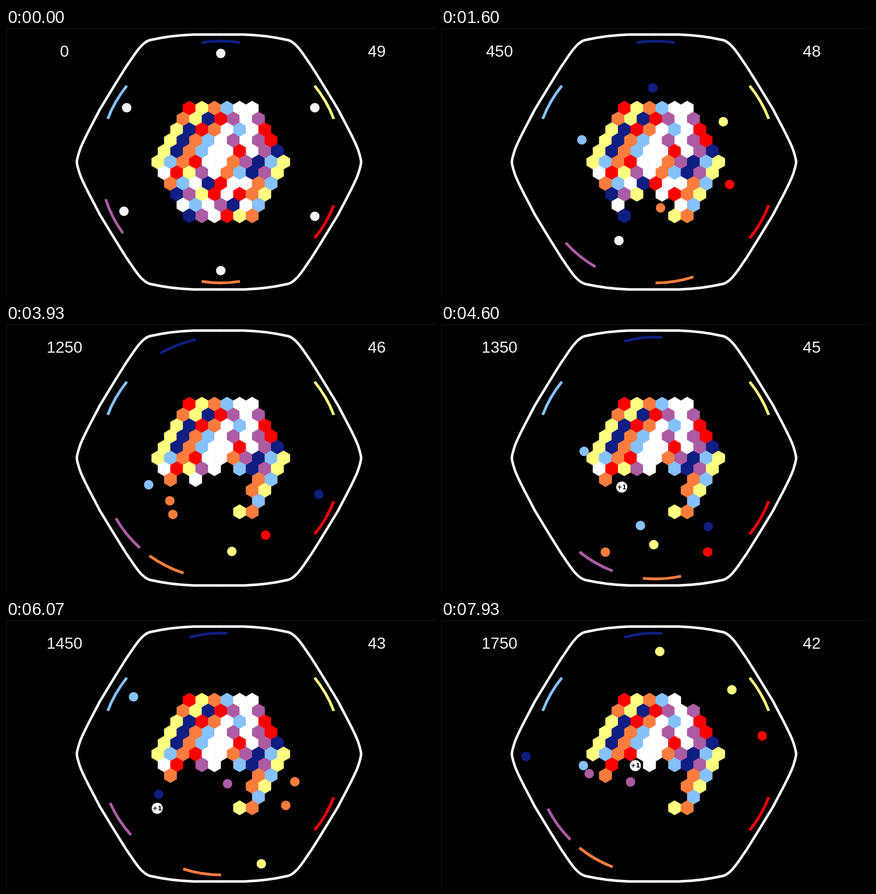
These frames come from a looping animation (851x532 px, 8 s). An HTML page with a canvas:

```html
<!DOCTYPE html>
<html lang="en">
<head>
<meta charset="utf-8">
<title>Hexagon breakout</title>
<style>
  html, body { margin: 0; width: 100%; height: 100%; overflow: hidden; background: #000; }
  canvas { display: block; }
</style>
</head>
<body>
<canvas id="stage" width="851" height="532"></canvas>
<script>
const ctx = document.getElementById('stage').getContext('2d');
const FPS = 15, FRAMES = 120;
const CX = 426, CY = 266, RAD = Math.PI / 180;
const RAIL = 240, WALL = 225, CORE = 130, LAUNCH = 215.5;
const BALL_SPEED = 14.5, DROP_SPEED = 3.5, BLAST = 45;
const COLORS = { r: '#ff0000', y: '#ffff80', o: '#fc7c3e', b: '#86c1fb',
                 w: '#ffffff', n: '#0f1e80', p: '#ab5ca3' };

const polar = (r, deg) => [CX + r * Math.cos(deg * RAD), CY + r * Math.sin(deg * RAD)];
const dist = (a, b) => Math.hypot(b[0] - a[0], b[1] - a[1]);
const mix = (a, b, u) => [a[0] + (b[0] - a[0]) * u, a[1] + (b[1] - a[1]) * u];

// Moves a point along its ray from the centre to radius r.
const onRadius = (p, r) => mix([CX, CY], p, r / dist([CX, CY], p));

// Block field: one letter per hexagon.
const CELLS = ['ryobww', 'oynrpwp', 'ynrowbwr', 'ynobwpwpr', 'ynobwwrwpn', 'yborwwopnby',
               'wrypwobnpy', 'obwnrwwob', 'npyrwroy', 'wbwpnwb', 'npwryo']
  .flatMap((row, r) => [...row].map((color, c) => ({
    row: r, col: c, color, end: Infinity,
    at: [CX + (c - (row.length - 1) / 2) * 24.95, CY + (r - 5) * 21.35]
  })));

// Hits: frame, row, column, effect. Bombs clear all neighbours within reach.
const HITS = [
  [10, 10, 2, 'bomb'], [25, 8, 4, 'bomb'], [42, 9, 0, 'bomb'],
  [62.4, 7, 2, 'drop'], [70, 6, 2], [111, 0, 5], [116, 6, 0], [118, 6, 3, 'drop']
].map(([frame, row, col, effect]) => {
  const { at } = CELLS.find(c => c.row === row && c.col === col);
  const reach = effect === 'bomb' ? BLAST : 1;
  const broken = CELLS.filter(c => c.end > frame && dist(c.at, at) < reach);
  broken.forEach(c => c.end = frame);
  return { frame, at, effect, points: 50 * (broken.length + 1) };
});

// Moments at which the moving parts pass their key poses.
const MARKS = [4, 24, 41, 59, 78, 91, 119];

const FIXED_PADDLES = [['y', -30], ['r', 30], ['b', 210]];
const MOVING_PADDLES = [
  ['n', [-90, -90, -90, -111, -96, -96, -96]],
  ['o', [90, 81, 117, 117, 81, 99, 120]],
  ['p', [153, 129, 159, 141, 120, 147, 144]]
];

// Balls: launch angle, colour at each mark, position at each later mark.
const BALLS = [
  [-90, 'wnnnnnn', [[420, 119], [585.5, 133.5], [620.5, 338], [449, 459.5], [303, 346], [168.5, 271]]],
  [-30, 'wyyyyyy', [[560, 186], [585, 330], [448, 451.5], [409, 352], [506.5, 484], [577, 138.5]]],
  [210, 'wbbbboy', [[279.5, 222], [279.5, 261], [283, 319], [497, 473], [573, 321], [434, 62.5]]],
  [30, 'wrrrror', [[572.5, 310.5], [580, 289], [515, 419], [519.5, 448.5], [555, 368], [637, 230]]],
  [90, 'woooppp', [[435.5, 357], [448, 394], [331, 378], [374, 447], [439.5, 325], [294, 305]]],
  [153, 'wwoobbb', [[353, 422], [337.5, 394.5], [325, 351], [247, 164.5], [253, 152.5], [282.5, 289]]]
];

// Index of the leg between two marks that holds frame f, and the share of it done.
function legAt(f) {
  const i = Math.max(0, MARKS.findIndex(m => m >= f) - 1);
  return [i, Math.max(0, (f - MARKS[i]) / (MARKS[i + 1] - MARKS[i]))];
}

// Paddles hurry to the next pose three degrees per frame, then wait.
function paddleAngle(poses, f) {
  const [i] = legAt(f), turn = poses[i + 1] - poses[i];
  const swing = 3 * Math.max(0, f - MARKS[i]);
  return poses[i] + Math.sign(turn) * Math.min(Math.abs(turn), swing);
}

function ballAt([angle, colors, keys], f) {
  const [i, u] = legAt(f);
  const to = keys[i], from = i ? keys[i - 1] : polar(LAUNCH, angle);
  const range = BALL_SPEED * (MARKS[i + 1] - MARKS[i]);
  const route = [from];
  if (!i) route.push(polar(CORE, angle), polar(WALL, angle));
  else if (dist(from, to) < 0.7 * range) route.push(onRadius(mix(from, to, 0.5), WALL));
  route.push(to);

  const lengths = route.slice(1).map((p, k) => dist(route[k], p));
  let left = u * lengths.reduce((a, b) => a + b), k = 0;
  while (k < lengths.length - 1 && left > lengths[k]) left -= lengths[k++];
  const recolored = u > 0 && k === lengths.length - 1;
  return [mix(route[k], route[k + 1], left / lengths[k]), colors[recolored ? i + 1 : i]];
}

function disc([x, y], r, fill) {
  ctx.beginPath();
  ctx.arc(x, y, r, 0, 7);
  ctx.fillStyle = fill;
  ctx.fill();
}

function drawBall(at, color) {
  disc(at, 9.5, color === 'w' ? '#f5f5f5' : COLORS[color]);
  ctx.strokeStyle = 'rgba(0,0,0,.2)';
  ctx.lineWidth = 1;
  ctx.stroke();
}

function label(text, x, y, font, fill) {
  ctx.font = font;
  ctx.fillStyle = fill;
  ctx.textAlign = 'center';
  ctx.fillText(text, x, y);
}

const quarter = new Path2D('M1-253H-50C-85-252-110-248-137-242C-155-237-170-209-183-191' +
  'C-206-155-220-131-236-105C-254-70-270-42-276-24C-280-12-282-5-282 1');
function drawWall() {
  ctx.strokeStyle = '#fff';
  ctx.lineWidth = 5;
  for (const sx of [1, -1]) for (const sy of [1, -1]) {
    ctx.save();
    ctx.translate(422.5, CY);
    ctx.scale(sx, sy);
    ctx.stroke(quarter);
    ctx.restore();
  }
}

function drawHex([x, y], color) {
  ctx.beginPath();
  for (let k = 0; k < 6; k++) {
    const a = (k * 60 + 30) * RAD;
    ctx.lineTo(x + 14.7 * Math.cos(a), y + 14.7 * Math.sin(a));
  }
  ctx.fillStyle = color;
  ctx.fill();
}

function drawPaddle(color, angle) {
  ctx.beginPath();
  ctx.arc(CX, CY, RAIL, (angle - 9.1) * RAD, (angle + 9.1) * RAD);
  ctx.strokeStyle = COLORS[color];
  ctx.lineWidth = 5.5;
  ctx.stroke();
}

// A bonus drifts outwards until a paddle turns it into a new ball.
function drawBonus({ frame, at }, f) {
  const startRadius = dist([CX, CY], at), catchRadius = 220;
  const radius = startRadius + DROP_SPEED * (f - frame);
  if (radius < catchRadius) {
    const [x, y] = onRadius(at, radius);
    disc([x, y], 11, '#fff');
    label('+1', x, y + 4.4, 'bold 12px "DejaVu Sans", sans-serif', '#000');
  } else {
    const caught = frame + (catchRadius - startRadius) / DROP_SPEED;
    const u = (f - caught) / (FRAMES - 1 - caught);
    drawBall(mix(onRadius(at, catchRadius), [376, 321.5], u), 'p');
  }
}

function draw(f) {
  ctx.fillStyle = '#000';
  ctx.fillRect(0, 0, 851, 532);
  ctx.fillStyle = '#202020';
  ctx.fillRect(0, 0, 851, 1);
  ctx.fillRect(0, 0, 1, 532);
  drawWall();

  for (const cell of CELLS) if (f < cell.end) drawHex(cell.at, COLORS[cell.color]);
  for (const [color, angle] of FIXED_PADDLES) drawPaddle(color, angle);
  for (const [color, poses] of MOVING_PADDLES) drawPaddle(color, paddleAngle(poses, f));
  for (const ball of BALLS) drawBall(...ballAt(ball, f));

  const past = HITS.filter(hit => hit.frame <= f);
  past.filter(hit => hit.effect === 'drop').forEach(hit => drawBonus(hit, f));

  const font = '32px "Liberation Sans", Arial, sans-serif';
  const score = past.reduce((sum, hit) => sum + hit.points, 0);
  label(score, 116, 56.5, font, '#f6f6f6');
  label(49 - Math.floor(f / FPS), 735.5, 56.5, font, '#f6f6f6');
}

const start = performance.now();
function tick() {
  const t = (performance.now() - start) % (FRAMES / FPS * 1000);
  draw(Math.min(FRAMES - 1, Math.floor(t * FPS / 1000 + 0.1)));
  requestAnimationFrame(tick);
}
tick();
</script>
</body>
</html>
```
